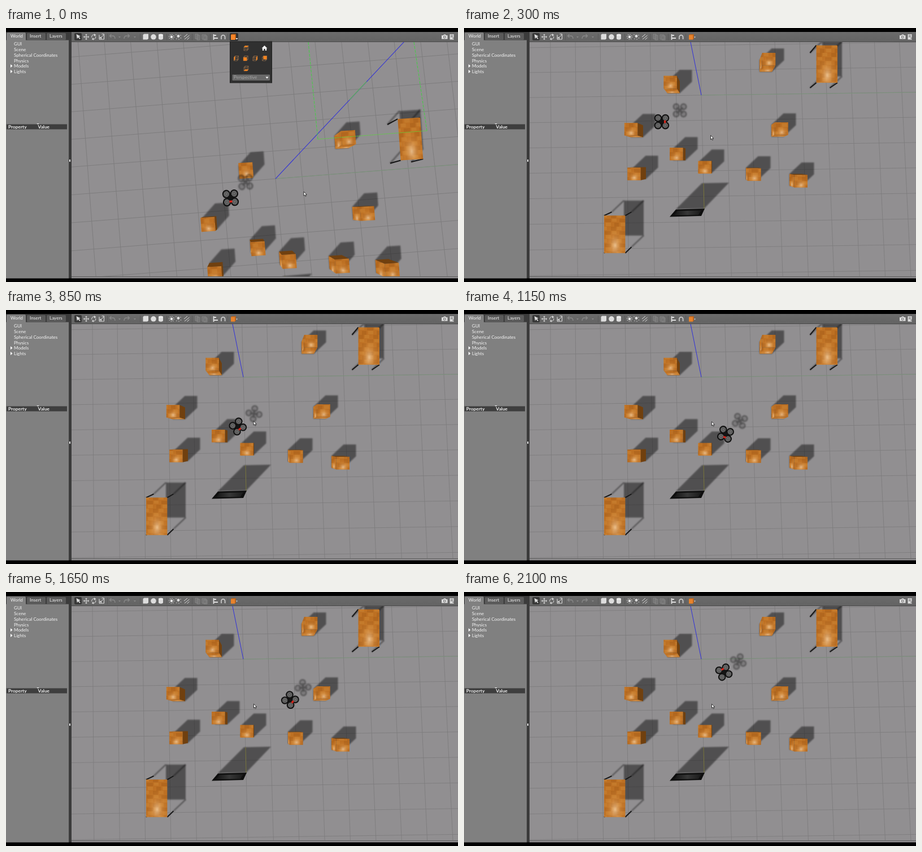
Animation, 800 px wide and 450 px high, one loop 2150 ms. Source, as an HTML page:

```html
<!DOCTYPE html>
<html lang="en">
<head>
<meta charset="utf-8">
<title>Drone simulation</title>
<style>
html, body { margin: 0; width: 100%; height: 100%; overflow: hidden; background: #000; }
svg { display: block; width: 800px; height: 450px; }
text { font: 8.1px Lato, "Open Sans", sans-serif; fill: #f4f4f4; }
.bold { font-weight: 700; font-size: 8.3px; }
.grid { stroke: #7b7a7b; stroke-width: .8; }
.shade { fill: #000; opacity: .44; filter: url(#soft); }
.shadeLine { stroke: #000; stroke-width: 2.4; opacity: .4; filter: url(#soft); }
.leg { stroke: #171717; stroke-width: 2; }
</style>
</head>
<body>
<svg viewBox="0 0 800 450" xmlns="http://www.w3.org/2000/svg">
  <defs>
    <filter id="soft" filterUnits="userSpaceOnUse" x="0" y="-150" width="900" height="700"><feGaussianBlur stdDeviation=".8"/></filter>
    <filter id="blur" x="-20%" y="-20%" width="140%" height="140%"><feGaussianBlur stdDeviation=".9"/></filter>
    <radialGradient id="shine" cx=".52" cy=".8" r=".6">
      <stop offset="0" stop-color="#ffe6c4" stop-opacity=".62"/>
      <stop offset=".45" stop-color="#eeb068" stop-opacity=".25"/>
      <stop offset="1" stop-color="#c87828" stop-opacity="0"/>
    </radialGradient>
    <pattern id="wood" width="26" height="22" patternUnits="userSpaceOnUse">
      <rect width="26" height="22" fill="#bd7023"/>
      <path d="M0 0h9v7h-9zM15 8h11v6h-11zM6 15h8v7h-8z" fill="#b2671e"/>
      <path d="M11 0h8v6h-8zM2 8h8v5h-8zM17 15h9v6h-9z" fill="#c47a2b"/>
    </pattern>
    <linearGradient id="bar" x2="0" y2="1">
      <stop offset="0" stop-color="#6b6b6b"/><stop offset="1" stop-color="#636363"/>
    </linearGradient>
    <linearGradient id="board" x2="1" y2="0">
      <stop offset="0" stop-color="#121212"/><stop offset=".5" stop-color="#383838"/><stop offset="1" stop-color="#191919"/>
    </linearGradient>
    <clipPath id="view"><rect x="116" y="25" width="684" height="415"/></clipPath>
  </defs>
  <rect width="800" height="450"/>
  <g clip-path="url(#view)">
    <rect x="116" y="25" width="684" height="416" fill="#918f91"/>
    <g id="near"></g>
    <g id="far"></g>
    <g id="air"><g id="shadow"></g><g id="drone"></g></g>
    <g id="overlay"></g>
  </g>
  <g id="ui"></g>
  <g id="popup"></g>
  <g id="cursor">
    <circle id="pivot" cx=".5" cy="1.5" r="5" fill="#f6ee00"/>
    <path d="M0 0v7.2l1.7-1.5 1.2 2.7 1.3-.6-1.2-2.6h2.3z" fill="#fff" stroke="#111" stroke-width=".8"/>
  </g>
</svg>
<script>
const $ = id => document.getElementById(id);
const poly = (pts, attrs) => `<polygon points="${pts.join(" ")}" ${attrs}/>`;
const path = (d, attrs) => `<path d="${d}" ${attrs}/>`;
const rect = (x, y, w, h, fill, more = "") => `<rect x="${x}" y="${y}" width="${w}" height="${h}" fill="${fill}" ${more}/>`;
const line = (a, b, attrs) => path(`M${a}L${b}`, `fill="none" ${attrs}`);
const text = (x, y, s, more = "") => `<text x="${x}" y="${y}" ${more}>${s}</text>`;

// One world, two cameras: nadir is the ground point below the camera, zenith the tip of the z axis.
const views = {
  near: { matrix: "matrix(1.06 -.068 .08 1.106 22.3 164)", nadir: [358.7, 156], zenith: [650, -86] },
  far: { matrix: "", nadir: [455, 235], zenith: [401, 25] }
};
const origin = [420, 119];
const light = [21.5, -20.3];
const cubes = [[371, 105], [534, 67], [306, 183], [555, 182], [311, 257], [381, 224], [428, 246], [510, 258], [587, 269]];
const tables = [[630, 75], [279, 357]];

const lift = (p, nadir) => p.map((v, i) => nadir[i] + (v - nadir[i]) * 1.07);
const cast = p => p.map((v, i) => v + light[i]);
const footprint = ([x, y], w, h) =>
  [[-1, -1], [1, -1], [1, 1], [-1, 1]].map(([i, j]) => [x + i * w / 2, y + j * h / 2]);
const wooden = pts => poly(pts, 'fill="url(#wood)"') + poly(pts, 'fill="url(#shine)"');

function hull(points) {
  const cross = (o, a, b) => (a[0] - o[0]) * (b[1] - o[1]) - (a[1] - o[1]) * (b[0] - o[0]);
  const half = list => {
    const out = [];
    for (const p of list) {
      while (out.length > 1 && cross(out.at(-2), out.at(-1), p) <= 0) out.pop();
      out.push(p);
    }
    return out.slice(0, -1);
  };
  const sorted = [...points].sort((a, b) => a[0] - b[0] || a[1] - b[1]);
  return [...half(sorted), ...half(sorted.reverse())];
}

function grid() {
  const [x, y] = origin, step = 44.4;
  let s = "";
  for (let i = -13; i < 14; i++) {
    const col = py => [x + i * step + (py - y) * (.025 + i * .003), py];
    const row = px => [px, y + i * step + .1 * i * i + (x - px) * .014];
    s += line(col(-180), col(460), 'class="grid"') + line(row(40), row(840), 'class="grid"');
  }
  return s;
}

function cube(center, nadir) {
  const base = footprint(center, 22, 21);
  const top = base.map(p => lift(p, nadir));
  const shade = poly(hull([...base, ...base.map(cast)]), 'class="shade"');
  let solid = "";
  top.forEach((p, i) => {
    const n = (i + 1) % 4, q = top[n], b = base[i];
    const facing = (b[0] - p[0]) * (q[1] - p[1]) - (b[1] - p[1]) * (q[0] - p[0]);
    const side = [p, q, base[n], b];
    if (facing > 0) solid += i < 2 ? poly(side, 'fill="#70400f"') : wooden(side);
  });
  return { shade, solid: solid + wooden(top) };
}

function table(center, nadir) {
  const feet = footprint(center, 35, 62);
  const top = feet.map(p => lift(p, nadir));
  const shade = poly(feet.map(cast), 'class="shade"')
    + feet.map(p => line(p, cast(p), 'class="shadeLine"')).join("");
  const legs = feet.map((p, i) => line(p, top[i], 'class="leg"')).join("");
  return { shade, solid: legs + wooden(top) };
}

function board() {
  return poly([[375, 321], [421, 275], [469, 274], [425, 320]], 'class="shade"')
    + line([424, 275], [425, 320], 'stroke="#7c793e"')
    + poly([[364, 334.5], [375, 321.5], [426, 320], [420, 333]], 'fill="#0e0e0e"')
    + poly([[371, 332], [378, 324], [420, 323], [415, 331]], 'fill="url(#board)"');
}

function scene({ matrix, nadir, zenith }) {
  const things = [...cubes.map(p => cube(p, nadir)), ...tables.map(p => table(p, nadir))];
  return `<g transform="${matrix}">` + grid()
    + line(origin, [800, 114], 'stroke="#7c987c" stroke-width=".8"')
    + line(origin, zenith, 'stroke="#3030d8"')
    + board()
    + things.map(o => o.shade).join("") + things.map(o => o.solid).join("") + "</g>";
}

function selection() {
  const green = 'stroke="#43d043" stroke-dasharray="5 2"';
  return line([535, 25], [552, 197], green) + line([722, 25], [745, 182], green)
    + line([552, 197], [745, 182], 'stroke="#58d838" stroke-dasharray="2 1"')
    + line([608, 127], [638, 95], 'stroke="#62a862" stroke-width="1.6"');
}

const arms = footprint([0, 0], 13, 13);

function droneShape() {
  return rect(-6, -6, 12, 12, "#141414")
    + arms.map(([x, y]) => `<g transform="translate(${x} ${y})"><circle r="6.8" fill="#0f0f0f"/>
      <circle r="4.9" fill="#4c4c4c"/>
      <circle r="3.2" fill="none" stroke="#858585" stroke-width="2.4" stroke-dasharray=".8 1.2"/>
      <circle r="1.3" fill="#777"/></g>`).join("")
    + rect(-4, -3.5, 8, 7, "#141414", 'rx="2"')
    + rect(4, -2.4, 3.4, 4.8, "#d3261c");
}

function droneShadow() {
  return `<g opacity=".42" filter="url(#blur)">`
    + path("M-5-5L5 5M-5 5L5-5", 'stroke="#000" stroke-width="4"')
    + arms.map(([x, y]) => `<circle cx="${x}" cy="${y}" r="4.8" fill="#0005" stroke="#000" stroke-width="2.2"/>`).join("")
    + "</g>";
}

function cubeIcon(x, y, face) {
  const faces = {
    top: "M-4-2l2-2.5h6l-2 2.5z", front: "M-4-2h6v6h-6z", right: "M2-2l2-2.5v6l-2 2.5z",
    left: "M-4-2l2-2.5v6l-2 2.5z", back: "M-2-4.5h6v6h-6z", bottom: "M-4 4l2-2.5h6l-2 2.5z"
  };
  return `<g transform="translate(${x} ${y})">`
    + path("M-4-2h6v6h-6zM-4-2l2-2.5h6l-2 2.5M4-4.5v6l-2 2.5M-2-4.5v6h6M-2 1.5l-2 2.5", 'fill="none" stroke="#9c7450" stroke-width=".7"')
    + path(faces[face], 'fill="#f5841f"') + "</g>";
}

function panel() {
  const rows = ["GUI", "Scene", "Spherical Coordinates", "Physics", "Models", "Lights"];
  let s = rect(0, 7, 116, 436.5, "#3b3b3b") + rect(0, 21.5, 111, 422, "#808080")
    + path("M1 22V10q0-2 2-2h30q2 0 2 2v12z", 'fill="#808080"')
    + rect(37, 9, 33, 12, "#5a5a5a", 'rx="1.5"') + rect(72, 9, 34, 12, "#5a5a5a", 'rx="1.5"')
    + text(8, 17.3, "World") + text(42, 17.3, "Insert") + text(77, 17.3, "Layers");
  rows.forEach((name, i) => {
    const y = 31.3 + i * 9.75;
    s += text(14, y, name);
    if (i > 3) s += path(`M8 ${y - 6}l3.5 3-3.5 3z`, 'fill="#fff"');
  });
  return s + rect(1, 170.5, 107, 9, "#3e3e3e") + path("M54 169h5l-2.5 2z", 'fill="#ddd"')
    + text(4, 177.9, "Property", 'class="bold"') + text(56.5, 177.9, "Value", 'class="bold"')
    + rect(112, 233, 2, 4, "#e4e4e4");
}

function toolbar() {
  const ink = 'fill="none" stroke="#ddd"';
  const dim = 'fill="none" stroke="#888" stroke-width="1.3"';
  const pale = 'fill="#ddd"';
  let s = rect(116, 7, 684, 17.5, "url(#bar)") + rect(116, 24, 684, 1, "#4b4b4b")
    + rect(116, 440, 684, 1, "#5c5c5c") + rect(116, 441, 684, 2.5, "#918f91")
    + rect(121, 9, 13, 13, "#383838", 'rx="2"')
    + path("M124.5 11l1.3 8 2-2.2 2.5 3 1.3-1.2-2.4-2.8 2.6-1.4z", pale)
    + path("M138 15.8h8M142 11.8v8", ink)
    + path("M142 10.5l2 2h-4zM142 21l2-2h-4zM137 15.8l2-2v4zM147 15.8l-2-2v4z", pale)
    + path("M152 17a3.7 3.7 0 0 1 5-4.8M158.6 14.8a3.7 3.7 0 0 1-5 4.6", ink)
    + path("M156 10l3.5 2.5-3.5 2zM155 17.5l-3.5 2 3.5 2z", pale)
    + path("M165 12v8h8.5v-9.3h-4M165 20l8-8M165 16.5h3.5v3.5", ink)
    + path("M184 14h5q4 0 4 5M186.5 11l-3 3 3 3M218 14h-5q-4 0-4 5M215.5 11l3 3-3 3", dim)
    + path("M199 15h4l-2 2.5zM226 15h4l-2 2.5z", 'fill="#888"')
    + path("M242.5 12l2-1.5h7.5v8.5l-2 1.5h-7.5z", pale)
    + '<circle cx="261" cy="15.8" r="4.8" fill="#ddd"/>'
    + path("M270 12.3v7q4 3 8 0v-7z", pale) + '<ellipse cx="274" cy="12.3" rx="4" ry="1.7" fill="#eee"/>'
    + '<circle cx="293" cy="15.8" r="2.2" fill="#eee"/><circle cx="293" cy="15.8" r="4.2" fill="none" stroke="#ddd" stroke-width="1.6" stroke-dasharray="1 2.3"/>'
    + '<circle cx="305" cy="14.5" r="2.4" fill="#ddd"/>' + path("M309 12v1.5M309.5 17v1.5M306 19v1.5M302 18.5v1.5M301 11v1.5", ink)
    + path("M315 16l6-5M316 20l8.5-7M320.5 20.5l4-3.5", ink)
    + path("M335 11h5v8h-5zM338 13h5v8h-5zM347 12h7v8h-7zM350 14h6v7h-6z", 'fill="#707070" stroke="#858585"')
    + path("M367.5 11v10M368 13h4M368 18h7", 'fill="none" stroke="#ddd" stroke-width="1.8"')
    + path("M381 20v-4a3.3 3.3 0 0 1 6.6 0v4", 'fill="none" stroke="#ccc" stroke-width="1.7"')
    + path("M398 12.5l2-1.5h7v8l-2 1.5h-7z", 'fill="#b86420"') + rect(398, 12.5, 7, 8, "#e8832c")
    + path("M407 15.5h3l-1.5 2z", 'fill="#ddd"')
    + path("M771 13h3l1-1.5h3l1 1.5h2.5v6.5h-10.5z", pale) + '<circle cx="776.3" cy="16" r="1.9" fill="#ddd" stroke="#666"/>'
    + path("M785.5 11h7v9.5h-7z", pale) + path("M787 13h4M787 15.5h4M790 18h4", 'stroke="#555"');
  for (const x of [179, 237, 284, 329, 361, 392]) s += rect(x, 10, 1, 12, "#5a5a5a");
  return s;
}

function popup() {
  const sides = ["left", "front", "right", "back"];
  return rect(396, 9, 15, 14, "#333", 'rx="2"') + path("M398 12l2-1.5h7v9l-2 1.5h-7z", 'fill="#b85c12"')
    + rect(398, 12, 7.5, 9, "#f7862a") + path("M406.5 18h4l-2 2.5z", 'fill="#fff"')
    + rect(396.5, 24, 74, 73, "#303030", 'stroke="#202020"')
    + cubeIcon(425, 36, "top") + cubeIcon(425, 72, "bottom")
    + sides.map((face, i) => cubeIcon(407.5 + i * 16.7, 54, face)).join("")
    + path("M452.5 36l5-5 5 5h-1.3v4h-2.4v-3h-2.5v3h-2.4v-4z", 'fill="#f1f1f1"')
    + rect(401, 83, 65.5, 9.5, "#686868", 'stroke="#838383" stroke-width=".6"')
    + text(403, 90.4, "Perspective", 'style="fill:#a9a9a9"')
    + path("M459.5 86.5h5l-2.5 3.2z", 'fill="#fff"');
}

$("near").innerHTML = scene(views.near);
$("far").innerHTML = scene(views.far);
$("overlay").innerHTML = selection();
$("drone").innerHTML = droneShape();
$("shadow").innerHTML = droneShadow();
$("ui").innerHTML = panel() + toolbar();
$("popup").innerHTML = popup();

// time, x, y, heading
const flight = [
  [0, 343, 145, 90],
  [100, 347, 148, 0],
  [550, 362, 188, 29],
  [1150, 463, 220, 108],
  [1450, 487, 221, 297],
  [1850, 508, 158, 495],
  [2100, 460, 142, 606]
];

function slope(keys, i, c) {
  const a = keys[Math.max(i - 1, 0)], b = keys[Math.min(i + 1, keys.length - 1)];
  return (b[c] - a[c]) / (b[0] - a[0]);
}

// Smooth curve through the keys.
function sample(keys, t) {
  let i = 0;
  while (i < keys.length - 2 && t >= keys[i + 1][0]) i++;
  const a = keys[i], b = keys[i + 1], d = b[0] - a[0], u = (t - a[0]) / d;
  const w = u * u * (3 - 2 * u);
  return a.slice(1).map((v, k) => v + (b[k + 1] - v) * w
    + d * u * (1 - u) * ((1 - u) * slope(keys, i, k + 1) - u * slope(keys, i + 1, k + 1)));
}

const place = (id, x, y, more = "") => $(id).setAttribute("transform", `translate(${x} ${y}) ${more}`);
const show = (id, on) => $(id).setAttribute("visibility", on ? "visible" : "hidden");

function draw(now) {
  const t = Math.floor(now % 2150 / 50) * 50;
  const first = t < 50;
  const { matrix, nadir } = first ? views.near : views.far;
  const [x, y, turn] = sample(flight, t);
  const [sx, sy] = [x, y].map((v, i) => v + (nadir[i] - v) * .06 + light[i] * 1.2);
  const settle = 1 - Math.exp(-Math.max(t - 100, 0) / 350);

  for (const id of ["near", "overlay", "popup"]) show(id, first);
  show("far", !first);
  show("pivot", !first && t < 200);
  $("air").setAttribute("transform", matrix);
  place("drone", x, y, `rotate(${turn})`);
  place("shadow", sx, sy, `rotate(${turn})`);
  if (first) place("cursor", 527, 290);
  else place("cursor", 435 + 3.5 * settle, 184 + 14.5 * settle);
}

function tick() {
  draw(performance.now());
  requestAnimationFrame(tick);
}
tick();
</script>
</body>
</html>
```
